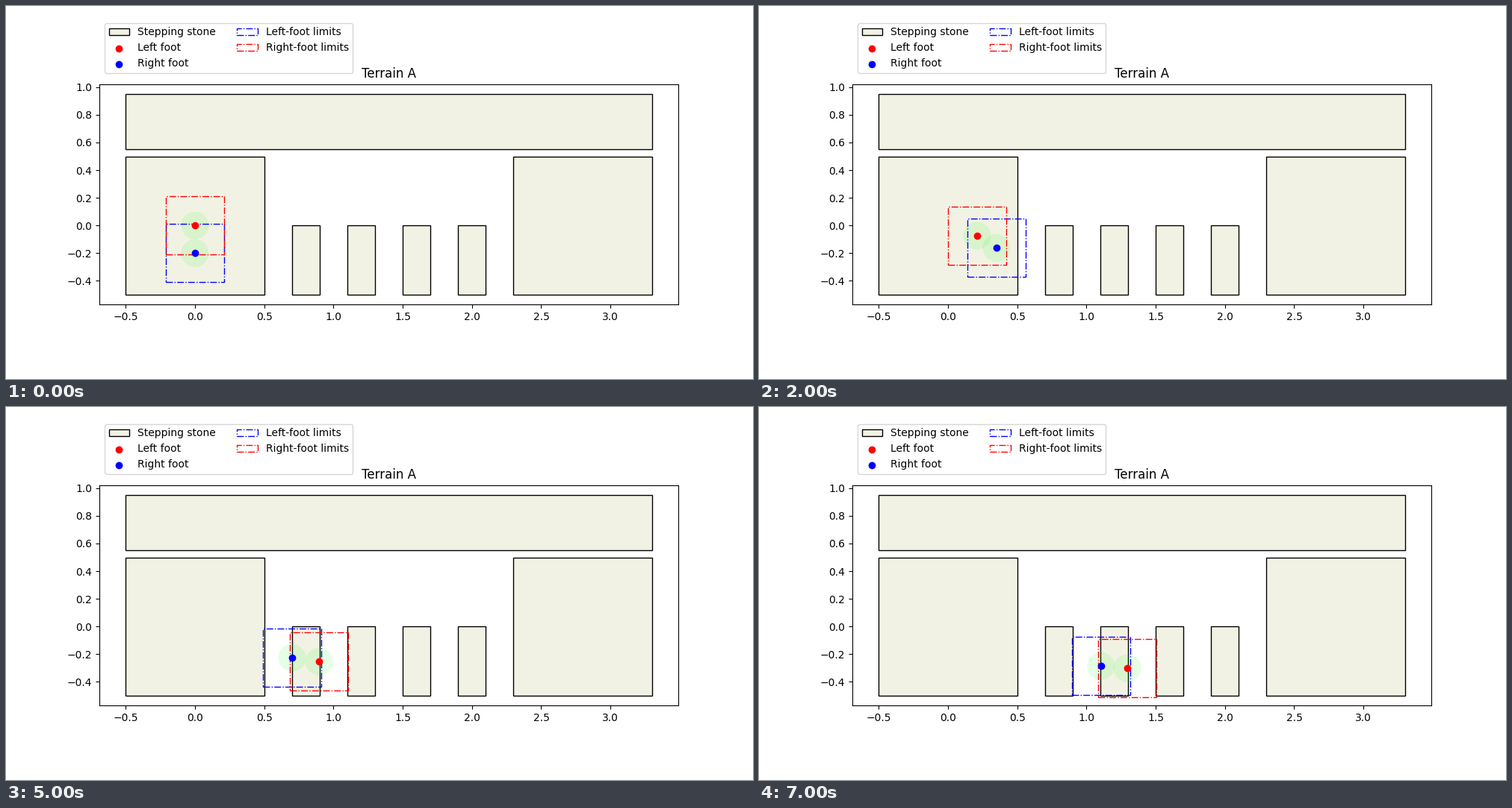
Animation, 1000 px wide and 500 px high, one loop 8000 ms. Source, as a matplotlib script:

```python
import matplotlib.pyplot as plt
from matplotlib.animation import FuncAnimation
from matplotlib.patches import Circle, Rectangle

SPAN = 0.42  # side of the square each foot may step within
REACH = 0.1

# Footholds in walking order; the left foot moves on odd steps, the right on even ones.
LEFT = [(0, 0), (0.21, -0.075), (0.497, -0.15), (0.897, -0.2525), (1.296, -0.301)]
RIGHT = [(0, -0.2), (0.351, -0.161), (0.702, -0.2255), (1.105, -0.285)]

plt.rcParams["font.family"] = "DejaVu Sans"
fig, ax = plt.subplots(figsize=(10, 5), dpi=100)
ax.set_aspect("equal")
ax.set_title("Terrain A")


def add_stone(x, y, width, height, label=None):
    ax.add_patch(Rectangle((x, y), width, height, fc="#f2f2e4", ec="black", label=label))


def add_reach():
    return ax.add_patch(Circle((0, 0), REACH, fc="lime", ec="none", alpha=0.1))


def add_limits(color, label):
    return ax.add_patch(Rectangle((0, 0), SPAN, SPAN, fc="none", ec=color, ls="-.", label=label))


add_stone(-0.5, -0.5, 1, 1, "Stepping stone")
add_stone(2.3, -0.5, 1, 1)
add_stone(-0.5, 0.55, 3.8, 0.4)
for i in range(4):
    add_stone(0.7 + 0.4 * i, -0.5, 0.2, 0.5)

left_reach, right_reach = add_reach(), add_reach()
left_foot = ax.scatter(0, 0, color="red", zorder=3, label="Left foot")
right_foot = ax.scatter(0, 0, color="blue", zorder=3, label="Right foot")
# Each foot's limits are centred on the opposite foot.
left_limits = add_limits("blue", "Left-foot limits")
right_limits = add_limits("red", "Right-foot limits")

ax.set_xlim(-0.69, 3.49)
ax.set_ylim(-0.5725, 1.0225)
ax.legend(loc="upper left", bbox_to_anchor=(0, 1.3), ncol=2)


def place(position, foot, reach, limits):
    x, y = position
    foot.set_offsets([(x, y)])
    reach.center = (x, y)
    limits.set_xy((x - SPAN / 2, y - SPAN / 2))


def update(step):
    place(LEFT[(step + 1) // 2], left_foot, left_reach, right_limits)
    place(RIGHT[step // 2], right_foot, right_reach, left_limits)


animation = FuncAnimation(fig, update, frames=8, interval=1000, init_func=lambda: update(0),
                          repeat=True, repeat_delay=0)
plt.show()
```
